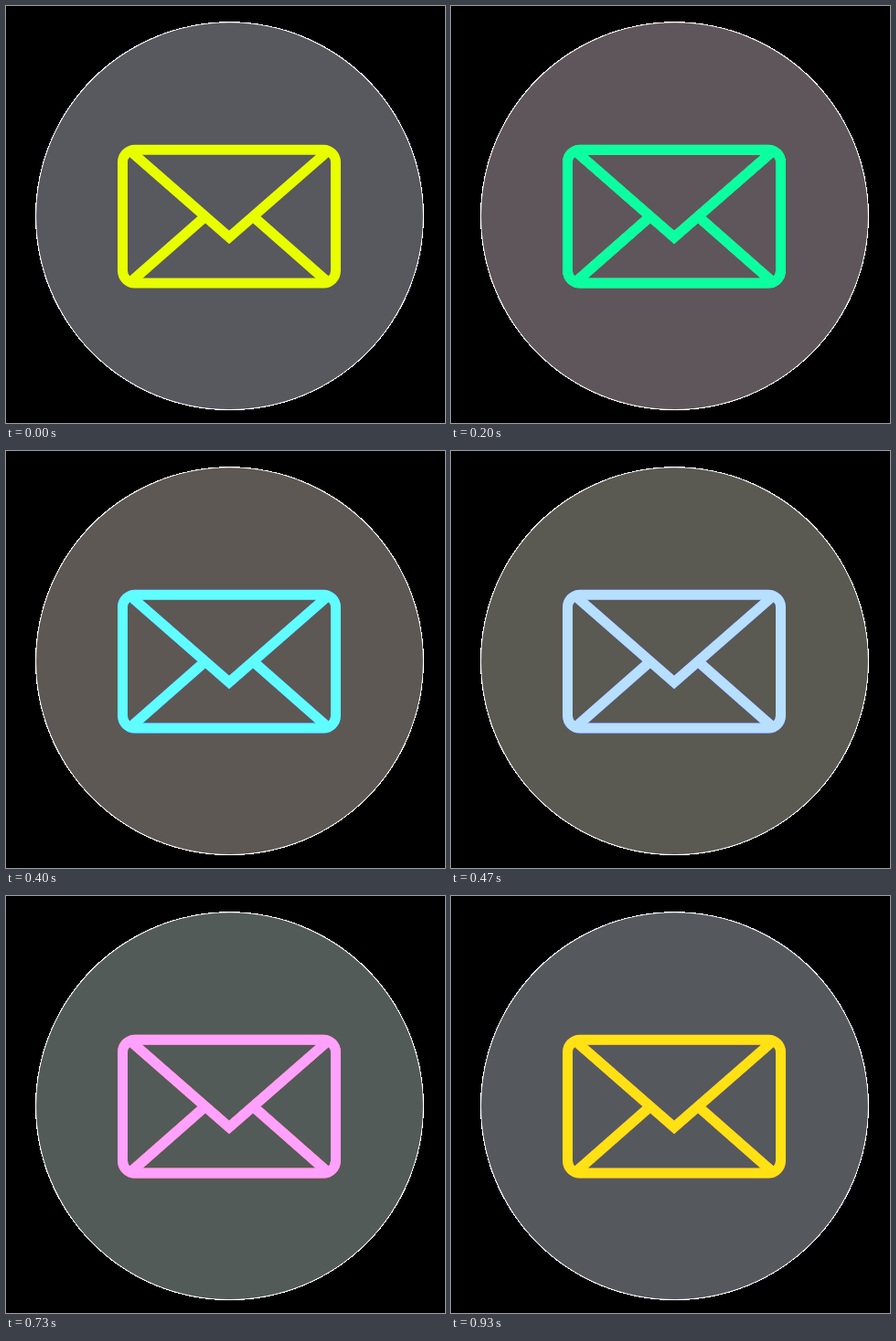
These frames come from a looping animation (480x456 px, 990 ms). An HTML page:

```html
<!DOCTYPE html>
<html lang="en">
<head>
<meta charset="utf-8">
<title>Colour-cycling envelope</title>
<style>
  html, body { margin: 0; width: 100%; height: 100%; overflow: hidden; background: #000; }
  svg { display: block; width: 480px; height: 456px; }
</style>
</head>
<body>
<svg id="icon" viewBox="0 0 480 456">
  <circle cx="244.5" cy="229.7" r="212.5" fill="#fff" shape-rendering="crispEdges"/>
  <circle cx="244.5" cy="229.7" r="211.4" fill="#58585f"/>
  <g fill="none" stroke="#e8ff00" stroke-width="11">
    <rect x="127.5" y="157.2" width="233" height="145.8" rx="13.5"/>
    <path d="M136 158.6L244 253L352 158.6M218 230L135 303M270 230L353 303"/>
  </g>
</svg>
<script>
  const LOOP = 990, STEPS = 15;
  const icon = document.getElementById('icon');

  // Steps of 1/15 s, with starts rounded to the nearest 10 ms
  function draw() {
    const ticks = Math.floor(performance.now() % LOOP / 10);
    const step = Math.floor((ticks + 0.5) * 0.15);
    icon.style.filter = `hue-rotate(${step * 360 / STEPS}deg)`;
    requestAnimationFrame(draw);
  }
  draw();
</script>
</body>
</html>
```
